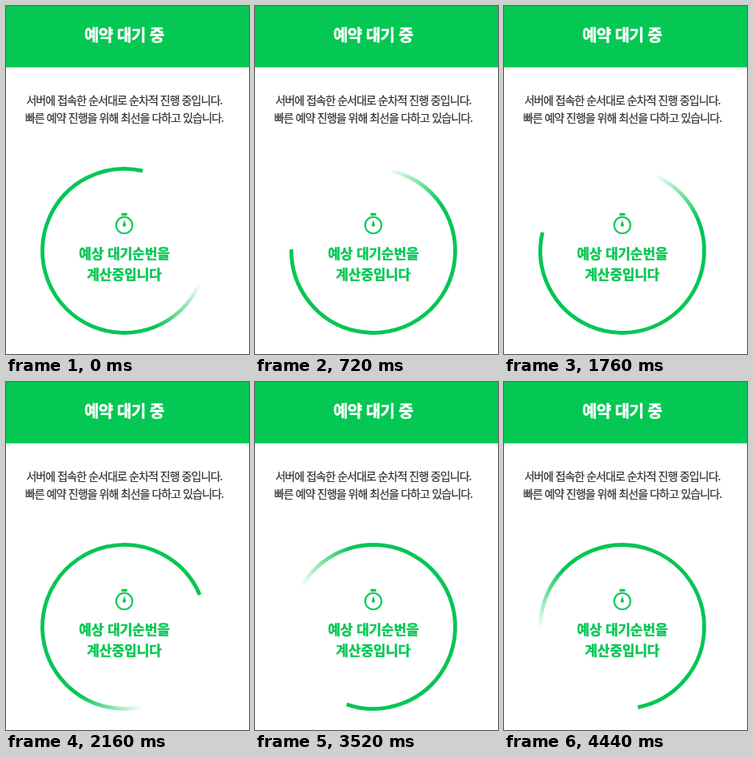
An HTML page with a canvas for the animation above (4.48 s loop, 304 px wide and 435 px high).

```html
<!DOCTYPE html>
<html lang="ko">
<head>
<meta charset="utf-8">
<title>예약 대기 중</title>
<style>
  html, body { margin: 0; width: 100%; height: 100%; overflow: hidden; background: #fff; }
  svg, canvas { position: absolute; left: 0; top: 0; width: 304px; height: 435px; display: block; }
  canvas { filter: blur(0.5px); }
  text { font-family: "Noto Sans CJK KR", "Noto Sans CJK", "Noto Sans KR", sans-serif; text-anchor: middle; }
  .title { font-size: 20px; font-weight: 700; letter-spacing: -0.5px; fill: #fff; stroke: #fff; stroke-width: 0.5px; }
  .note { font-size: 14px; letter-spacing: -0.92px; fill: #333; stroke: #333; stroke-width: 0.25px; }
  .status { font-size: 17px; font-weight: 700; letter-spacing: -0.08px; fill: #04c853; stroke: #04c853; stroke-width: 0.5px; }
</style>
</head>
<body>
<svg viewBox="0 0 304 435">
  <rect width="304" height="76.7" fill="#04c853"/>
  <text class="title" x="147.8" y="44">예약 대기 중</text>
  <text class="note" x="148" y="123">서버에 접속한 순서대로 순차적 진행 중입니다.</text>
  <text class="note" x="148" y="145">빠른 예약 진행을 위해 최선을 다하고 있습니다.</text>
  <g fill="#04c853">
    <rect x="144.4" y="258.8" width="7.2" height="3.2" rx="1"/>
    <circle cx="148" cy="274" r="10.2" fill="none" stroke="#04c853" stroke-width="2.1"/>
    <path d="M148 267.5 L149.9 273.3 A2 2 0 1 1 146.1 273.3 Z"/>
  </g>
  <text class="status" x="148" y="316">예상 대기순번을</text>
  <text class="status" x="148" y="342">계산중입니다</text>
</svg>
<canvas id="ring"></canvas>
<script>
  const LOOP = 4480, STEP = 40;
  const CX = 148, CY = 306, RADIUS = 102.5, WIDTH = 4.8;
  const START = 283, SWEEP = 260, FADE = 45;
  const rad = deg => deg * Math.PI / 180;

  const canvas = document.getElementById("ring");
  const ctx = canvas.getContext("2d");
  const scale = window.devicePixelRatio || 1;
  canvas.width = 304 * scale;
  canvas.height = 435 * scale;

  // One turn per second in 6° ticks, sampled every 40 ms.
  const headAngle = time => START + 6 * Math.floor(Math.floor(time / STEP) * 12 / 5);

  const paint = ctx.createConicGradient(0, 0, 0);
  paint.addColorStop(0, "rgba(4,198,83,0)");
  paint.addColorStop(FADE / 360, "rgb(4,198,83)");
  paint.addColorStop(1, "rgb(4,198,83)");

  function drawRing(head) {
    ctx.setTransform(scale, 0, 0, scale, 0, 0);
    ctx.clearRect(0, 0, 304, 435);
    ctx.translate(CX, CY);
    ctx.rotate(rad((head - SWEEP) % 360));
    ctx.strokeStyle = paint;
    ctx.lineWidth = WIDTH;
    ctx.beginPath();
    ctx.arc(0, 0, RADIUS, rad(0.5), rad(SWEEP));
    ctx.stroke();
  }

  const begin = performance.now();
  function tick() {
    drawRing(headAngle((performance.now() - begin) % LOOP));
    requestAnimationFrame(tick);
  }
  tick();
</script>
</body>
</html>
```
